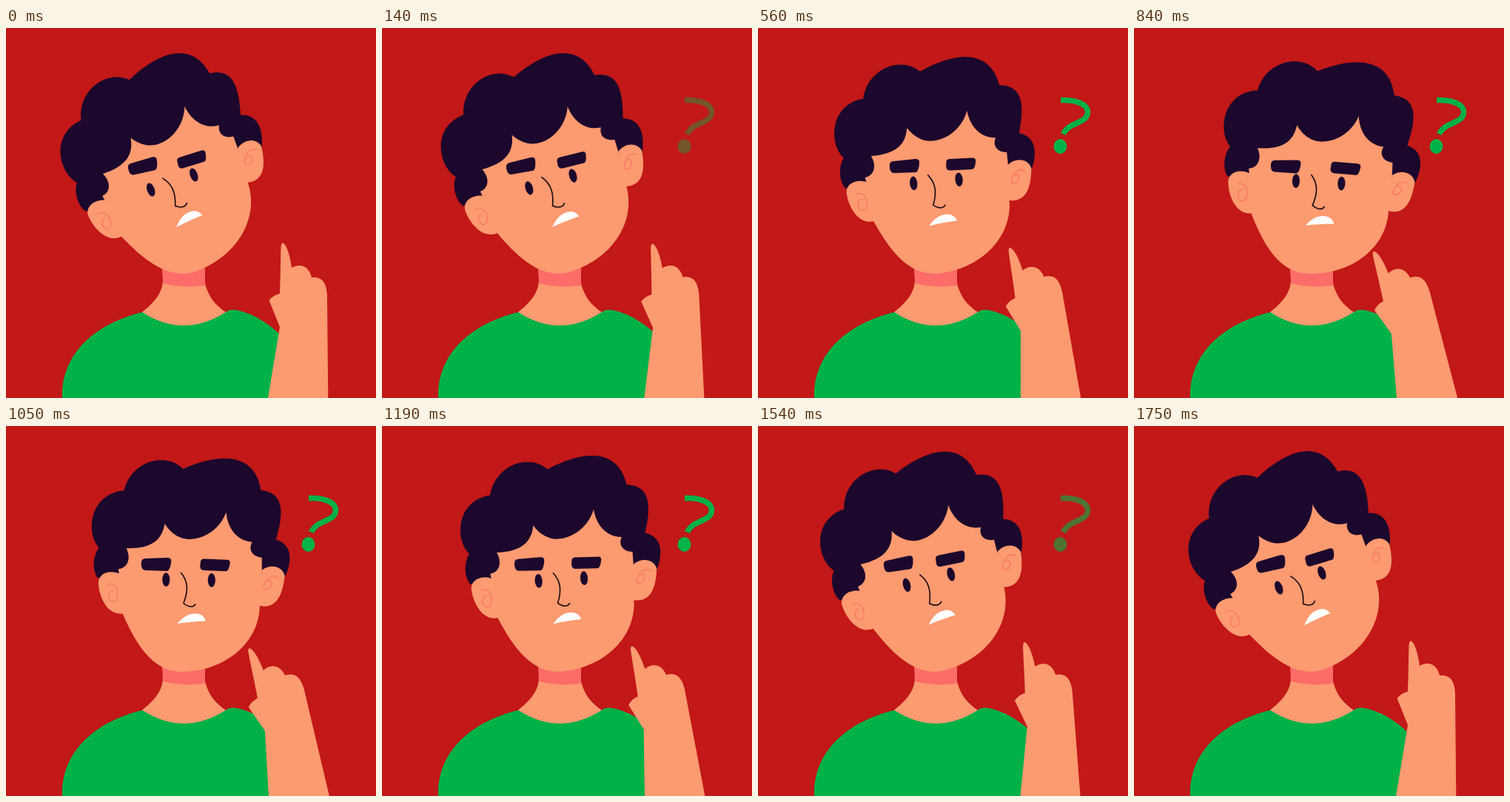
Recreate the animation shown at these times as an HTML page with a canvas. Size 500 by 500 pixels, loop 1.82 s.

```html
<!DOCTYPE html>
<html lang="en">
<head>
<meta charset="utf-8">
<title>Puzzled man</title>
<style>
  html, body { margin: 0; width: 100%; height: 100%; overflow: hidden; background: #c21817; }
  canvas { display: block; width: 100%; height: 100%; }
</style>
</head>
<body>
<canvas id="stage" width="500" height="500"></canvas>
<script>
const ctx = document.getElementById('stage').getContext('2d');

const STEP = 70, STEPS = 26, TURN = 13, END = 25;
const RED = '#c21817', GREEN = '#00b148', SKIN = '#fc9a70';
const PINK = '#fc6c68', DARK = '#1c082c', EAR_LINE = '#fa775f';

const shape = d => new Path2D(d);

const neck = shape('M211 318L212 338C213 360 196 374 184 384L184 388Q240 424 297 388L297 384C282 374 273 362 269 345L268.500 318Z');
const neckShade = shape('M211 318L212 345Q240 352 269 348L268.500 318Z');
const shirt = shape('M76 501C74 440 120 400 184 384Q240 420 297 384Q302 380 310 381C332 385 353 397 372 416L385 440L385 501Z');

const face = shape('M157 252C170 281 193 333 238 332C300 331 343 290 343 242L352 230L350 170L300 110L215 110L160 150L140 210Z');
const hair = shape('M124 205C117 195 117 176 126 164C108 144 113 91 160 87C170 47 216 34 240 58' +
  'C290 36 337 36 345 87C374 90 378 113 365 154C386 160 389 181 376 207L346 205L346 178' +
  'C334 177 327 168 333 157C314 156 300 140 298 117C290 138 270 153 248 153C232 153 220 141 215 132' +
  'C211 155 196 166 163 165C170 180 164 192 152 193L154 205Z');
const ears = shape('M155 200C140 193 125 199 125 212C126 232 138 257 159 253Z' +
  'M346 195C358 186 374 190 377 203C374 228 366 249 342 243Z');
const earLines = shape('M138 214C147 212 152 220 151 228C150 239 141 240 139 232C138 226 141 222 145 222' +
  'M368 206C361 199 352 207 349 215C346 223 354 223 358 217C361 212 359 208 354 210');
const leftBrow = shape('M183 185Q183 179 189 179L218 178Q224 178 223.500 183Q222 195 218 196L189 195Q183 195 183 187Z');
const rightBrow = shape('M263 185Q263 179.500 268 179.500L298 181Q304 181 303 186Q301 197 297 196.500L267 195Q262 194 262.500 189Z');
const nose = shape('M237 198.500C246 210 247 222 240 239.500C244 243 252 247 256 241');
const mouth = shape('M231.500 267C241 256 249 253 257 253.500C265 254 268 258 270 263.500C257 264 245 265 231.500 267Z');

const arm = shape('M350.700 520L370 404L355.500 368Q361 361 370 359C371 340 371 310 371.500 296Q372 290 374.500 290.500' +
  'C380 294 384 309 386 324C396 318 409 320 413 337C425 336 433 341 434 361L435.500 520Z');
const hook = shape('M409 97.500C430 96.500 445.500 103 445.500 113.500C445.500 130 420 126 412.500 143.500');

function fill(path, color) {
  ctx.fillStyle = color;
  ctx.fill(path);
}

function line(path, color, width, cap = 'round') {
  ctx.strokeStyle = color;
  ctx.lineWidth = width;
  ctx.lineCap = cap;
  ctx.lineJoin = 'round';
  ctx.stroke(path);
}

function oval(x, y, rx, ry, color) {
  ctx.fillStyle = color;
  ctx.beginPath();
  ctx.ellipse(x, y, rx, ry, 0, 0, Math.PI * 2);
  ctx.fill();
}

function rotated(x, y, degrees, paint, dx = 0) {
  ctx.save();
  ctx.translate(x + dx, y);
  ctx.rotate(degrees * Math.PI / 180);
  ctx.translate(-x, -y);
  paint();
  ctx.restore();
}

function paintHead() {
  fill(face, SKIN);
  fill(hair, DARK);
  fill(ears, SKIN);
  line(earLines, EAR_LINE, 1.3);
  fill(rightBrow, DARK);
  oval(216.5, 207.5, 5.1, 9.4, DARK);
  oval(278, 208.5, 5.1, 9.4, DARK);
  line(nose, '#180810', 1.6);
  fill(mouth, '#fff');
}

function paintMark(alpha) {
  ctx.globalAlpha = alpha;
  line(hook, GREEN, 7.5, 'butt');
  oval(408.5, 160, 9, 10, GREEN);
  ctx.globalAlpha = 1;
}

function draw(now) {
  const step = Math.floor(now / STEP) % STEPS;
  // 0 = leaning away, 1 = finger closest to the chin
  const swing = step <= TURN ? step / TURN : (END - step) / (END - TURN);
  const tilt = 24.1 * Math.pow(swing, 1.07) - 20;
  const fade = Math.min(1, step / 5, (END - step) / 5);

  ctx.fillStyle = RED;
  ctx.fillRect(0, 0, 500, 500);
  fill(neck, SKIN);
  fill(neckShade, PINK);
  fill(shirt, GREEN);
  rotated(237.5, 272, tilt, paintHead);
  // the left brow slides level and turns less than the head
  rotated(203, 187, tilt * 0.72, () => fill(leftBrow, DARK), tilt * 0.9);
  rotated(395, 498, -15.3 * swing, () => fill(arm, SKIN));
  paintMark(fade);
}

function tick() {
  draw(performance.now());
  requestAnimationFrame(tick);
}
tick();
</script>
</body>
</html>
```
